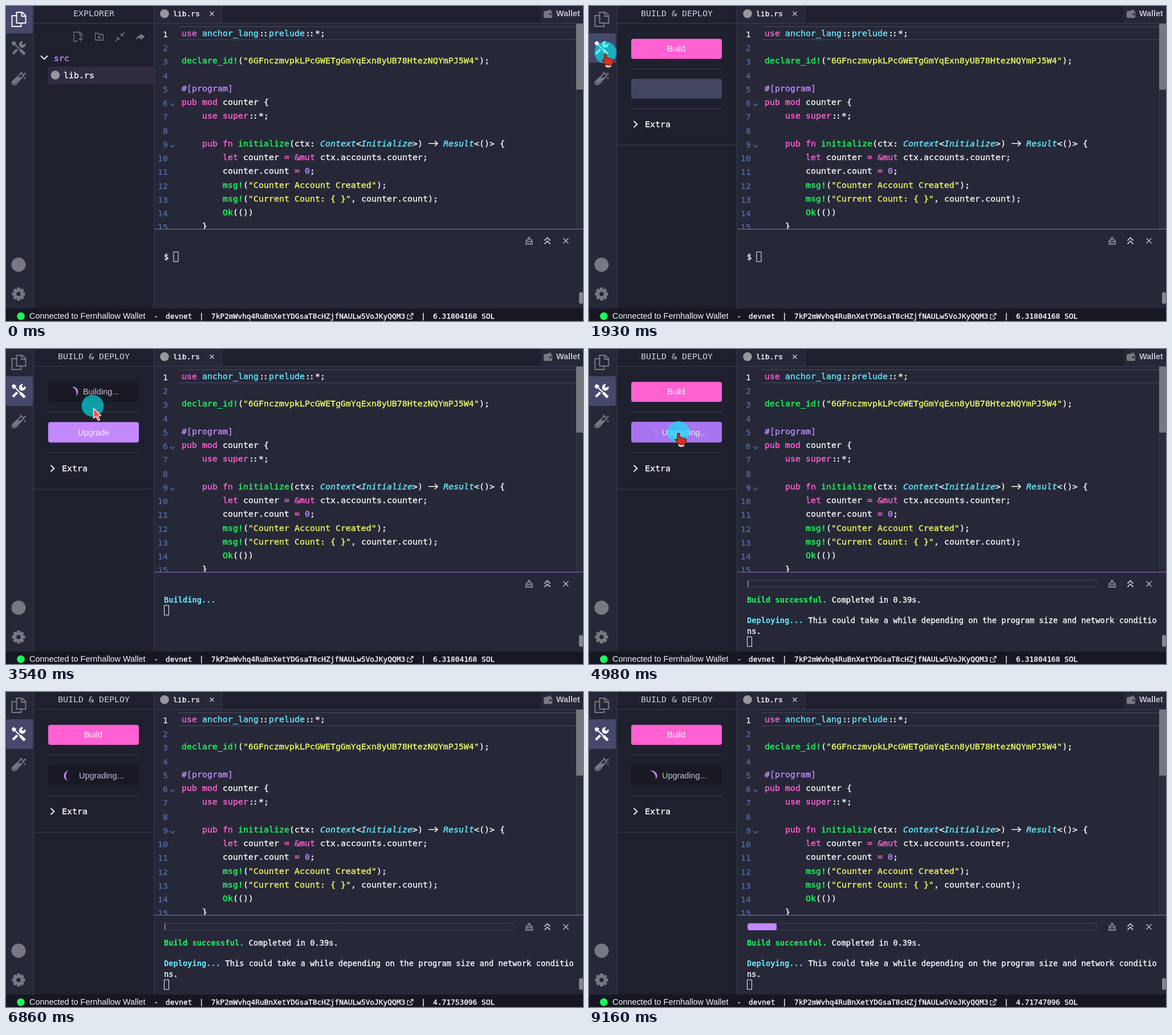
These frames come from a looping animation (1012x554 px, 9230 ms). An HTML page with a canvas:

```html
<!DOCTYPE html>
<html lang="en">
<head>
<meta charset="utf-8">
<title>Build and deploy</title>
<style>
html, body { margin: 0; width: 100%; height: 100%; overflow: hidden; background: #262837; }
canvas { display: block; }
</style>
</head>
<body>
<canvas id="stage" width="1012" height="554"></canvas>
<script>
const ctx = document.getElementById('stage').getContext('2d');
const LOOP = 9230, STEP = 70;
const MONO = '"DejaVu Sans Mono", "Noto Sans Mono", monospace';
const SANS = '"Liberation Sans", Arial, sans-serif';
const BG = '#262838', SIDE = '#1f202d', LINE = '#3a3c51', GREY = '#777881', WHITE = '#f5f5f7';
const PURPLE = '#c488ff', PINK = '#ff61d3';
const PINK_RGB = [232, 84, 192], PURPLE_RGB = [169, 116, 240], DARK_RGB = [24, 25, 35];
const INK = { w: '#f3f3f0', p: '#ff60d0', c: '#66e8fc', i: '#66e8fc', g: '#1cfa5c', y: '#e9f65f', v: '#c08cfa' };

// Moments at which the interface changes
const T = { panel: 1860, ready: 2420, build: 2980, built: 4170, deploy: 4980, paid: 6300, write: 6930 };

const code = [
  ['p', 'use ', 'c', 'anchor_lang', 'w', '::', 'c', 'prelude', 'w', '::*;'],
  [],
  ['g', 'declare_id!', 'w', '(', 'y', '"6GFnczmvpkLPcGWETgGmYqExn8yUB78HtezNQYmPJ5W4"', 'w', ');'],
  [],
  ['v', '#[program]'],
  ['p', 'pub mod ', 'w', 'counter {'],
  ['p', '    use super', 'w', '::*;'],
  [],
  ['p', '    pub fn ', 'g', 'initialize', 'w', '(ctx: ', 'i', 'Context', 'w', '<', 'i', 'Initialize',
    'w', '>) -> ', 'i', 'Result', 'w', '<()> {'],
  ['p', '        let ', 'w', 'counter ', 'p', '= &mut ', 'w', 'ctx.accounts.counter;'],
  ['w', '        counter.count ', 'p', '= ', 'v', '0', 'w', ';'],
  ['g', '        msg!', 'w', '(', 'y', '"Counter Account Created"', 'w', ');'],
  ['g', '        msg!', 'w', '(', 'y', '"Current Count: { }"', 'w', ', counter.count);'],
  ['g', '        Ok', 'w', '(())'],
  ['w', '    }']
];

// Pointer path: time, x, y, ease-out power
const path = [
  [190, 951, 552, 1], [640, 470, 310, 1], [1090, 144, 137, 1.2], [1160, 116, 121, 1], [1230, 88, 107, 1],
  [1720, 29, 82, 2], [2210, 29, 82, 1], [2840, 152, 77, 1.8], [3190, 152, 77, 1], [3540, 152, 100, 1],
  [3960, 157, 146, 1.6], [5250, 157, 146, 1], [5890, 62, 490, 1], [6090, 38, 585, 1]
];

const clamp = v => Math.max(0, Math.min(1, v));
const mix = (a, b, k) => `rgb(${a.map((v, i) => Math.round(v + (b[i] - v) * k))})`;

function rect(x, y, w, h, color, r = 0) {
  ctx.fillStyle = color;
  ctx.beginPath();
  ctx.roundRect(x, y, w, h, r);
  ctx.fill();
}

function disc(x, y, r, color) {
  ctx.fillStyle = color;
  ctx.beginPath();
  ctx.arc(x, y, r, 0, Math.PI * 2);
  ctx.fill();
}

function stroke(d, x, y, color, width = 1.5, fill) {
  ctx.save();
  ctx.translate(x, y);
  ctx.lineWidth = width;
  ctx.lineJoin = 'round';
  ctx.strokeStyle = color;
  const p = new Path2D(d);
  if (fill) { ctx.fillStyle = fill; ctx.fill(p); }
  ctx.stroke(p);
  ctx.restore();
}

// Medium-weight monospace text by advance width; y is the middle of the capitals
function mono(s, x, y, color, adv = 9, style = '', weight = 0.4) {
  const size = adv / 0.602, base = y + size * 0.365;
  ctx.font = `${style} ${size}px ${MONO}`;
  ctx.fillStyle = ctx.strokeStyle = color;
  ctx.lineWidth = weight;
  ctx.fillText(s, x, base);
  if (weight) ctx.strokeText(s, x, base);
}

function sans(s, x, y, color, weight = '') {
  ctx.font = `${weight} 14.4px ${SANS}`;
  ctx.fillStyle = color;
  ctx.fillText(s, x, y + 5);
}

function codeLine(parts, y) {
  let col = 0;
  for (let k = 0; k < parts.length; k += 2) {
    const kind = parts[k], s = parts[k + 1], x = 308 + col * 9;
    mono(s.replace('::', '  ').replace('->', '  '), x, y, INK[kind], 9, kind === 'i' ? 'italic' : '');
    if (s.includes('::')) {
      mono(':', x + 1.2, y, INK.w);
      mono(':', x + 7.8, y, INK.w);
    }
    const at = s.indexOf('->');
    if (at >= 0) stroke('M1 0H17M12-4.5L17 0L12 4.5', x + at * 9, y + 0.5, INK.w, 1.6);
    col += s.length;
  }
}

function filesIcon(color) {
  stroke('M-4-12H6L12-6V7H-4ZM5-12V-5H12M-4-6H-12V13H4V7', 22.5, 23, color, 2);
}

function toolsIcon(color, back) {
  stroke('M-10 10L3-3', 22, 74, color, 4);
  stroke('M12-8A5.5 5.5 0 1 1 7-12L5.5-7.5L8-5Z', 22, 74, color, 1, color);
  stroke('M-8-8L11 11', 22, 74, back, 6.5);
  stroke('M-8-8L3 3', 22, 74, color, 2.4);
  stroke('M3 3L11 11', 22, 74, color, 5);
  stroke('M-12-9L-9-12L-4-9L-9-4Z', 22, 74, color, 1, color);
}

function tubeIcon() {
  stroke('M3-10L10-3M5-8L-10 6Q-13 10-10 12Q-7 13-4 11L9-4', 22, 126, GREY, 2);
  stroke('M-3 0L4 0L-6 10Q-9 11-10 8Z', 22, 126, GREY, 1, GREY);
  disc(33, 119, 1.8, GREY);
  disc(33, 127, 1.5, GREY);
}

function gearIcon() {
  ctx.save();
  ctx.translate(22, 506.5);
  for (let k = 0; k < 8; k++) {
    ctx.rotate(Math.PI / 4);
    rect(-3, -11.5, 6, 7, GREY, 1.5);
  }
  ctx.restore();
  disc(22, 506.5, 8.5, GREY);
  disc(22, 506.5, 3.8, BG);
}

function activityBar(onBuild) {
  const lit = '#45486a';
  rect(0, 0, 48, 532, BG);
  rect(0, onBuild ? 48 : 0, 47, onBuild ? 52 : 48, lit);
  filesIcon(onBuild ? GREY : WHITE);
  toolsIcon(onBuild ? WHITE : GREY, onBuild ? lit : BG);
  tubeIcon();
  disc(22, 455, 12.5, GREY);
  gearIcon();
}

function editor() {
  rect(260, 0, 752, 30, SIDE);
  rect(260, 0, 118, 30, BG);
  rect(378, 0, 1, 30, LINE);
  disc(278, 13.5, 7.8, '#96979d');
  mono('lib.rs', 293, 13, WHITE, 7.85);
  stroke('M-3.5-3.5L3.5 3.5M3.5-3.5L-3.5 3.5', 361, 13.5, '#c6c7cf', 1.4);
  rect(938, 0, 74, 30, BG);
  rect(943, 9, 15, 12, GREY, 2);
  stroke('M0 3L12-1', 944, 8, GREY, 2);
  rect(953, 13, 4, 3, BG, 1);
  sans('Wallet', 965, 13, '#bfc0c8', 'bold');

  ctx.save();
  ctx.beginPath();
  ctx.rect(260, 31, 752, 361);
  ctx.clip();
  rect(303, 36, 697, 1, '#494b60');
  rect(303, 59, 697, 1, '#494b60');
  code.forEach((parts, n) => {
    const y = 47.3 + n * 24.25, num = String(n + 1);
    mono(num, 284 - num.length * 9, y + 2.2, n ? '#5b70aa' : WHITE, 9, '', 0.2);
    if (n === 5 || n === 8) stroke('M-4-2L0 2L4-2', 292, y + 5, '#5b70aa', 1.3);
    codeLine(parts, y);
  });
  ctx.restore();
  rect(1000, 31, 12, 361, '#2b2d3a');
  rect(1000, 31, 1, 361, LINE);
  rect(1000, 31, 12, 116, '#77787f');
}

function terminal(t) {
  rect(260, 392, 752, 1, '#8f6cc0');
  const row = n => 440.5 + n * 18.4, adv = 8.27;
  const say = (s, n, c = WHITE, col = 0, style = '') =>
    mono(s, 277 + col * adv, row(n), c, adv, style, style ? 0 : 0.4);
  const caret = (col, n) => stroke('M0 0H8V17H0Z', 277.5 + col * adv, row(n) - 8, WHITE, 1);

  if (t < T.build) {
    say('$', 0);
    caret(2, 0);
  } else if (t < T.built) {
    say('Building...', 0, INK.c, 0, 'bold');
    caret(0, 1);
  } else {
    say('Build successful.', 0, INK.g, 0, 'bold');
    say('Completed in 0.39s.', 0, WHITE, 18);
    if (t < T.deploy) {
      say('$', 2);
      caret(2, 2);
    } else {
      say('Deploying...', 2, INK.c, 0, 'bold');
      say('This could take a while depending on the program size and network conditio', 2, WHITE, 13);
      say('ns.', 3);
      caret(0, 4);
      stroke('M4 0H608Q612 0 612 4V8Q612 12 608 12H4Q0 12 0 8V4Q0 0 4 0Z', 278.5, 406.5, '#43455a', 1);
      const w = 1.2 + 50 * clamp((t - T.write) / 1800);
      rect(278, 407, w, 12, PURPLE, Math.min(4, w / 2));
    }
  }
  const c = '#b8b9c0';
  stroke('M-1.5-6H1.5V-1.5H5V1.5H-5V-1.5H-1.5ZM-5 1.5L-6 6H6L5 1.5M-2 6V3.5M2 6V3.5', 917.5, 413, c, 1.2);
  stroke('M-5 0L0-5L5 0M-5 6L0 1L5 6', 949.5, 412.5, c, 2);
  stroke('M-4.5-4.5L4.5 4.5M4.5-4.5L-4.5 4.5', 982, 413, c, 1.5);
  rect(1005, 503, 7, 21, '#85868c', 3.5);
}

function balance(t) {
  if (t < T.paid) return '6.31804168';
  if (t < 7350) return '4.71753096';
  if (t < 8190) return '4.71750096';
  return t < 8740 ? '4.71747596' : '4.71747096';
}

function statusBar(t) {
  const adv = 7.74, say = (s, x) => mono(s, x, 545.5, WHITE, adv);
  rect(0, 532, 1012, 22, '#161721');
  disc(26, 545.5, 6.8, INK.g);
  sans('Connected to Fernhallow Wallet', 41, 544.5, WHITE);
  say('-', 259.5);
  say('devnet', 280);
  say('|', 339);
  say('7kP2mWvhq4RuBnXetYDGsaT8cHZjfNAULw5VoJKyQQM3', 360);
  stroke('M-1-3H-5V5H3V1M1-5H5V-1M5-5L-1 1', 709, 545.5, WHITE, 1.2);
  say('|', 728);
  say(balance(t) + ' SOL', 749);
}

function title(s, x) {
  mono(s, x, 13, '#c3d3dc', 9, '', 0);
}

function explorer(hover) {
  title('EXPLORER', 118);
  stroke('M4-8H-7V8H0M4-8L7-4V0M3-8V-3H7', 126, 54, GREY, 1.3);
  stroke('M1 5H9M5 1V9', 126, 53, GREY, 1.3);
  stroke('M-7-6H-2L0-4H7V6H-7ZM-3 1H3M0-2V4', 163.5, 54, GREY, 1.3);
  stroke('M8-8L2-2M2-6V-2H6M-8 8L-2 2M-6 2H-2V6', 200, 54, GREY, 1.4);
  stroke('M0-5L7 0L0 5V2Q-5 1-7 5Q-6-2 0-2Z', 236, 54, GREY, 1, GREY);
  stroke('M-6-3L0 3L6-3', 67, 90.5, WHITE, 2);
  mono('src', 84, 92, PURPLE);
  rect(74, 107, 185, 30.5, hover ? '#634c91' : '#2f2c42');
  disc(86.5, 121.5, 7.8, '#96979d');
  mono('lib.rs', 101, 122, WHITE);
}

function spinner(x, y, t, start, alpha) {
  ctx.save();
  ctx.translate(x, y);
  ctx.rotate(-Math.PI / 6 + (t - start) / 523 * Math.PI * 2);
  ctx.globalAlpha = alpha;
  ctx.fillStyle = PURPLE;
  ctx.beginPath();
  ctx.arc(0, 0, 9, -Math.PI / 2, Math.PI / 2);
  ctx.ellipse(0, 0, 5.6, 9, 0, Math.PI / 2, -Math.PI / 2, true);
  ctx.fill();
  ctx.restore();
}

function buildPanel(t, over) {
  const building = t >= T.build && t < T.built, ready = t >= T.ready, d = ready ? 2 : 0;
  title('BUILD & DEPLOY', 91);

  const idle = over === 'build' ? mix(PINK_RGB, DARK_RGB, 0) : PINK;
  rect(74, 57.7, 159, 35.3, building ? mix(PINK_RGB, DARK_RGB, clamp((t - T.build) / 200)) : idle, 4);
  if (building) {
    spinner(117.5, 75.5, t, 3010, 1);
    sans('Building...', 135, 75, '#c2c3d8');
  } else sans('Build', 137, 75, WHITE);

  rect(74, 110, 159, 1, LINE);
  if (!ready) rect(74, 128, 159, 35, '#434661', 4);
  else if (t < T.deploy) {
    rect(74, 128.5, 159, 36, over === 'upgrade' ? '#a974f0' : PURPLE, 4);
    sans('Upgrade', 126, 146.5, WHITE);
  } else {
    const k = clamp((t - T.deploy) / 200);
    rect(74, 128, 159, 36.5, mix(PURPLE_RGB, DARK_RGB, k), 4);
    spinner(110.5, 147.3, t, T.deploy, 0.5 + k / 2);
    sans('Upgrading...', 128, 146.5, mix([240, 235, 250], [194, 195, 216], k));
  }
  rect(74, 180 + d, 159, 1, LINE);
  stroke('M-3-5.5L3 0L-3 5.5', 81.5, 208 + d, WHITE, 1.8);
  mono('Extra', 98, 208 + d, WHITE);
  rect(49, 244 + d, 210, 1, LINE);
}

function pointerAt(t) {
  const n = path.findIndex(p => p[0] > t);
  if (n < 1) return null;
  const a = path[n - 1], b = path[n];
  const k = 1 - Math.pow(1 - (t - a[0]) / (b[0] - a[0]), b[3]);
  return [a[1] + (b[1] - a[1]) * k, a[2] + (b[2] - a[2]) * k];
}

function target(p, t) {
  if (!p) return '';
  const [x, y] = p, onBuild = t >= T.panel;
  if (x < 48 && y < 140) return 'icon';
  if (!onBuild) return x > 74 && x < 259 && y >= 106.9 && y < 136.9 ? 'row' : '';
  if (x < 74 || x > 233) return '';
  if (y >= 57 && y <= 93 && (t < T.build || t >= T.built)) return 'build';
  return y >= 128 && y <= 165 && t >= T.ready && t < T.deploy + STEP ? 'upgrade' : '';
}

function pointer([x, y], hand) {
  disc(x, y, 19.3, 'rgba(0,237,243,.62)');
  if (!hand) {
    stroke('M0 0V18L4.5 14.5L8 22L11 20.5L7.8 13.5H13Z', x + 1.5, y + 4, '#fff', 1.2, '#f4504a');
    return;
  }
  stroke('M-2 17H11L10 24Q4 27 0 24Z', x, y + 1, '#4a1512', 0.8, '#f4ece8');
  stroke('M-2 2Q0-1 2 2V9Q5 7 7 10Q10 8 11 11Q14 10 14 13L12 20Q5 23-1 20L-6 13Q-6 10-2 13Z',
    x, y + 1, '#4a0c0a', 1, '#d9301f');
}

// Hold each picture for one step, counted from the latest anchor
function hold(t) {
  const a = [0, 190, 1090, 4980, 6860, 8810].filter(v => v <= t).pop();
  return a + Math.floor((t - a) / STEP) * STEP;
}

function draw(t) {
  const p = pointerAt(t), over = target(p, t), onBuild = t >= T.panel;
  rect(0, 0, 1012, 554, BG);
  activityBar(onBuild);
  rect(48, 0, 211, 532, SIDE);
  if (onBuild) buildPanel(t, over);
  else explorer(over === 'row');
  editor();
  rect(48, 0, 1, 532, LINE);
  rect(259, 0, 1, 532, LINE);
  rect(49, 30, 963, 1, LINE);
  terminal(t);
  statusBar(t);
  if (p) pointer(p, over !== '');
}

function frame(now) {
  draw(hold(now % LOOP));
  requestAnimationFrame(frame);
}
frame(0);
</script>
</body>
</html>
```
